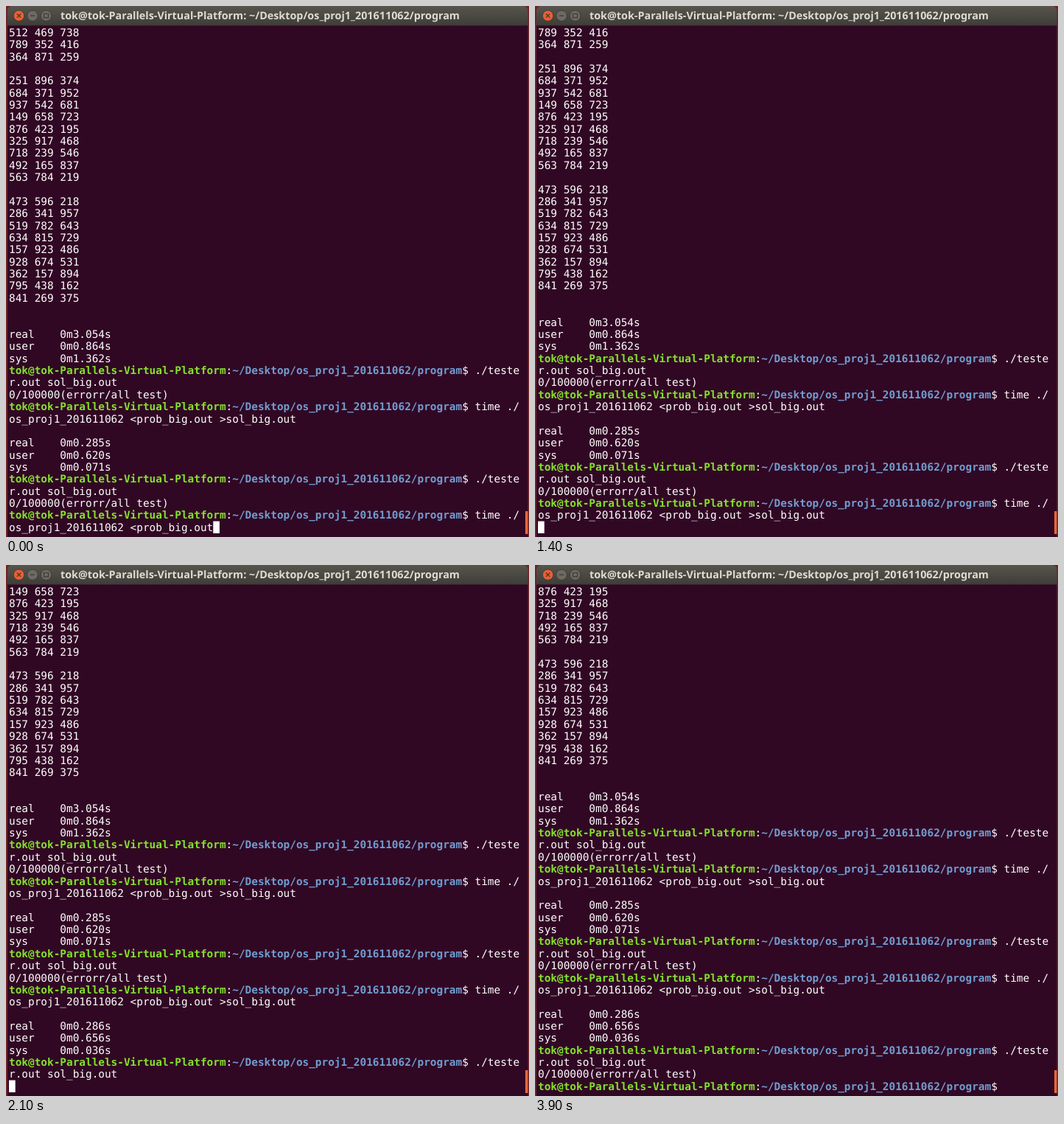
Write an HTML page with a canvas that moves like this. It is 710 by 720 pixels and loops after 4 s.

```html
<!DOCTYPE html>
<html>
<head>
<meta charset="utf-8">
<style>
  html, body { margin: 0; width: 100%; height: 100%; overflow: hidden; background: #6e2226; }
  canvas { display: block; }
</style>
</head>
<body>
<canvas id="stage" width="710" height="720"></canvas>
<script>
const ctx = document.getElementById('stage').getContext('2d');
const LOOP = 4000, COLS = 80, ROWS = 42;
const LEFT = 4, TOP = 27.6, CELL_W = 8.664, CELL_H = 16.366, BASELINE = 13.2;
const MONO = '14.39px "DejaVu Sans Mono", monospace';

const host = 'tok@tok-Parallels-Virtual-Platform';
const path = '~/Desktop/os_proj1_201611062/program';
const prompt = `${host}:${path}$ `;
const solve = 'time ./os_proj1_201611062 <prob_big.out >sol_big.out';
const check = './tester.out sol_big.out';
const checked = '\n0/100000(errorr/all test)\n';
const timing = (real, user, sys) => `\nreal    0m${real}s\nuser    0m${user}s\nsys     0m${sys}s\n`;

const boards = `512 469 738
789 352 416
364 871 259

251 896 374
684 371 952
937 542 681
149 658 723
876 423 195
325 917 468
718 239 546
492 165 837
563 784 219

473 596 218
286 341 957
519 782 643
634 815 729
157 923 486
928 674 531
362 157 894
795 438 162
841 269 375

`;
const history = boards + timing('3.054', '0.864', '1.362') +
  prompt + check + checked +
  prompt + solve + '\n' + timing('0.285', '0.620', '0.071') +
  prompt + check + checked + prompt;

// Everything printed so far at time t
function screenText(t) {
  if (t < 1300) {
    const missing = t < 1200 ? 13 - Math.floor(t / 125) : 0;
    return history + solve.slice(0, solve.length - missing);
  }
  let text = history + solve + '\n';
  if (t >= 1600) text += timing('0.286', '0.656', '0.036') + prompt;
  if (t >= 1900) text += check;
  if (t >= 2500) text += checked + prompt;
  else if (t >= 2100) text += '\n';
  return text;
}

function cursorOn(t) {
  if (t < 2100) return t < 1600 || t >= 1900;
  return Math.floor((t - 2100) / 600) % 2 === 0;
}

function rect(color, x, y, w, h) {
  ctx.fillStyle = color;
  ctx.fillRect(x, y, w, h);
}

function button(x, fill, glyph) {
  ctx.beginPath();
  ctx.arc(x, 13.2, 7.2, 0, 7);
  ctx.fillStyle = fill;
  ctx.fill();
  ctx.strokeStyle = '#3a3833';
  ctx.lineWidth = 0.8;
  ctx.stroke();
  ctx.lineWidth = 1.2;
  ctx.stroke(new Path2D(`M${x} 13.2${glyph}`));
}

function drawWindow() {
  rect('#6e2226', 0, 0, 710, 720);
  const bar = ctx.createLinearGradient(0, 0, 0, 27);
  bar.addColorStop(0, '#57554d');
  bar.addColorStop(1, '#3d3c37');
  ctx.fillStyle = bar;
  ctx.beginPath();
  ctx.roundRect(2, 0, 706.5, 27, [6, 6, 0, 0]);
  ctx.fill();
  rect('#310824', 2, 26.5, 706.5, 693.5);
  rect('#e8683c', 705, 685, 3.5, 31);

  button(17.5, '#ea5f34', 'm-2.7-2.7l5.4 5.4m0-5.4l-5.4 5.4');
  button(36, '#6c6a62', 'm-3 0h6');
  button(54.5, '#6c6a62', 'm-3-2.7h6v5.4h-6z');

  ctx.textRendering = 'geometricPrecision';
  ctx.font = 'bold 14.35px "Noto Sans", sans-serif';
  ctx.fillStyle = '#dfdbd2';
  ctx.fillText(`${host}: ${path}`, 74, 18.2);
}

function drawLine(line, row) {
  const isPrompt = line.startsWith(host);
  const pathEnd = host.length + 1 + path.length;
  [...line].forEach((char, col) => {
    const inHost = isPrompt && col < host.length;
    const inPath = isPrompt && col > host.length && col < pathEnd;
    ctx.font = (inHost || inPath ? 'bold ' : '') + MONO;
    ctx.fillStyle = inHost ? '#84e22c' : inPath ? '#709dd0' : '#ffffff';
    ctx.fillText(char, LEFT + col * CELL_W, TOP + row * CELL_H + BASELINE);
  });
}

function draw(now) {
  const t = Math.floor(now % LOOP / 100) * 100;
  const lines = screenText(t).split('\n')
    .flatMap(line => line.match(new RegExp(`.{1,${COLS}}`, 'g')) || ['']).slice(-ROWS);
  drawWindow();
  lines.forEach(drawLine);
  if (cursorOn(t)) {
    const col = lines[ROWS - 1].length;
    rect('#ffffff', LEFT + col * CELL_W, TOP + (ROWS - 1) * CELL_H, CELL_W, CELL_H);
  }
}

const start = performance.now();
function tick() {
  draw(performance.now() - start);
  requestAnimationFrame(tick);
}
tick();
</script>
</body>
</html>
```
